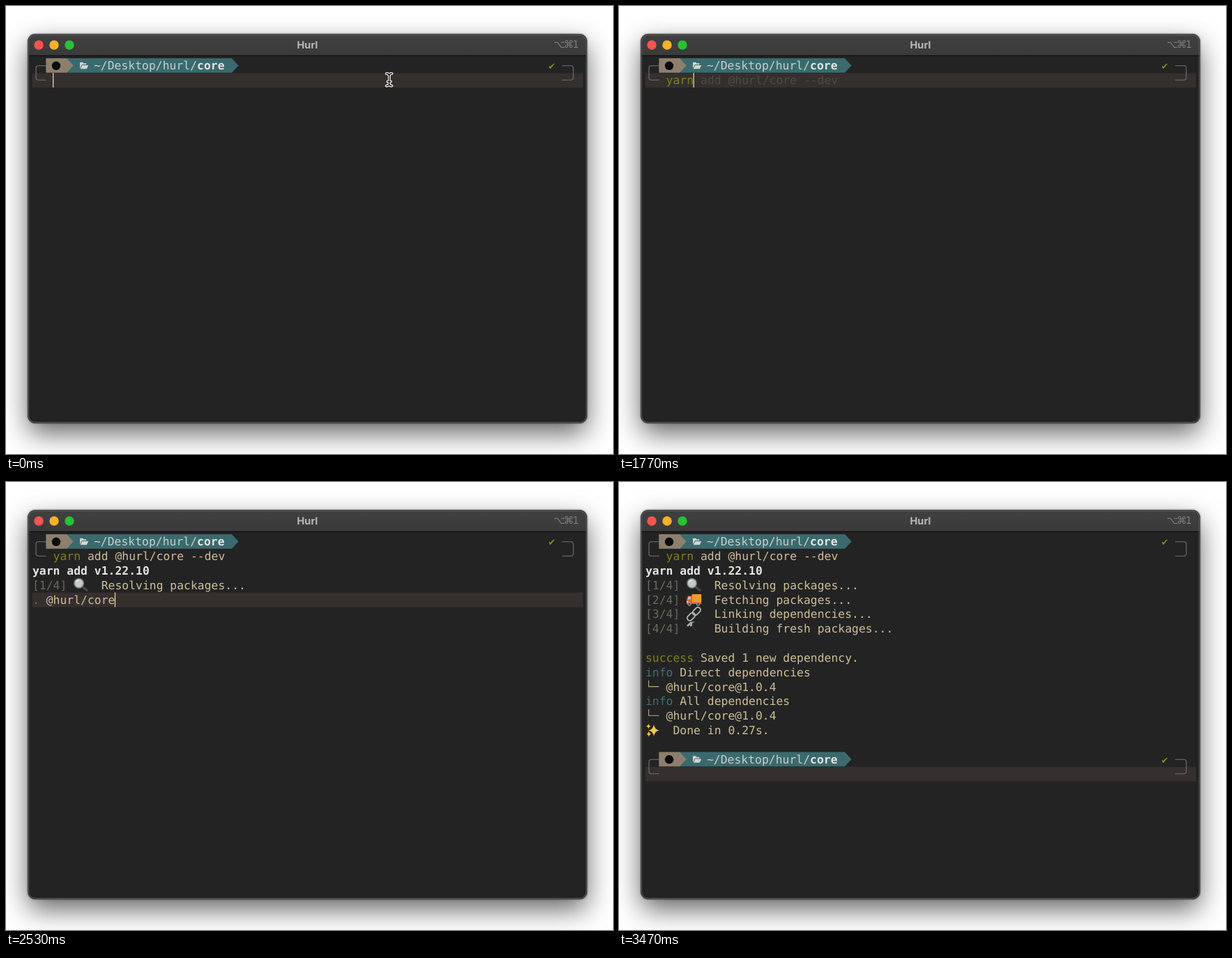
Animation of 871x643 px, one loop 3.51 s. Source, as an HTML page:

```html
<!DOCTYPE html>
<html lang="en">
<head>
<meta charset="utf-8">
<title>Terminal</title>
<style>
  html, body { margin: 0; width: 100%; height: 100%; overflow: hidden; background: #fff; }
  .window {
    position: absolute; left: 32px; top: 41px; width: 801px; height: 557px;
    border-radius: 10px; background: #232323;
    box-shadow: 0 0 0 1px #3a3a3a, 0 0 3px 1px rgba(0, 0, 0, .45), 0 15px 38px rgba(0, 0, 0, .62);
  }
  svg { position: absolute; left: 0; top: 0; }
  text {
    font: 16.4px "DejaVu Sans Mono", monospace;
    white-space: pre; text-rendering: geometricPrecision; fill: #cdbe97;
  }
  .title { font: 700 14.5px Inter, sans-serif; fill: #bababa; text-anchor: middle; }
  .keys { font: 14.5px "DejaVu Sans", sans-serif; fill: #7e7e7e; text-anchor: middle; }
  .check { font: 13px "DejaVu Sans", sans-serif; fill: #808a1b; text-anchor: middle; }
  .path { fill: #c8cfcb; }
  .bold { font-weight: 700; fill: #e4e4e0; }
  .green { fill: #7f801d; }
  .blue { fill: #41706f; }
  .dim { fill: #6d675c; }
  .hint { fill: #4e4947; }
  .bad { fill: #d43d2c; font-weight: 700; }
  .rule { fill: none; stroke: #737373; stroke-width: 1.1; }
  .tree { fill: none; stroke: #b9ac8a; stroke-width: 1.1; }
</style>
</head>
<body>
<div class="window"></div>
<svg width="871" height="643" viewBox="0 0 871 643">
  <defs>
    <linearGradient id="bar" x2="0" y2="1">
      <stop stop-color="#404040"/><stop offset="1" stop-color="#3a3a3a"/>
    </linearGradient>
    <path id="star" d="M0-1Q.15-.15 1 0Q.15.15 0 1Q-.15.15-1 0Q-.15-.15 0-1Z"/>
    <g id="prompt">
      <path class="rule" d="M57.5 85.8H46.5Q43 85.8 43 89.3V102.8Q43 106.3 46.5 106.3H57.5M798 85.8H810.5Q814 85.8 814 89.3V102.8Q814 106.3 810.5 106.3H798"/>
      <path fill="#3a6a6e" d="M86 75H324L333.7 85.4L324 95.8H86Z"/>
      <path fill="#8d7f6e" d="M57.3 75H87L96.7 85.4L87 95.8H57.3Z"/>
      <circle cx="72" cy="85.8" r="6.2" fill="#0b0b0b"/>
      <path fill="#d3d5cd" d="M106 89V81.6Q106 80.8 106.8 80.8H110L111.3 82.2H114.6Q115.4 82.2 115.4 83V84H109L106.4 89ZM109.4 85H118.2L115.8 90.2H106.8Z"/>
      <text class="path" x="126" y="91.3">~/Desktop/hurl/<tspan class="bold">core</tspan></text>
      <text class="check" x="783.3" y="91">✔</text>
    </g>
  </defs>

  <path fill="url(#bar)" d="M32 71V51Q32 41 42 41H823Q833 41 833 51V71Z"/>
  <path stroke="#0c0c0c" stroke-width="1.3" d="M32 71.4H833"/>
  <rect x="32.5" y="41.5" width="800" height="556" rx="9.5" fill="none" stroke="#686868" stroke-opacity=".75"/>
  <circle cx="47" cy="56" r="6.7" fill="#fd544e"/>
  <circle cx="69" cy="56" r="6.7" fill="#fdb225"/>
  <circle cx="91" cy="56" r="6.7" fill="#28c136"/>
  <text class="title" x="432.5" y="60.6">Hurl</text>
  <text class="keys" x="794" y="60">⌥</text>
  <text class="keys" x="807.5" y="60">⌘</text>
  <text class="keys" x="817.5" y="60">1</text>

  <rect id="band" x="37.6" width="790.4" height="20.8" fill="#352f2e"/>
  <use href="#prompt"/>
  <text id="command" x="67.6" y="112.1"><tspan id="verb"></tspan><tspan id="rest"></tspan><tspan id="hint" class="hint"></tspan></text>
  <g id="output"></g>

  <g data-from="2410">
    <path d="M109 149.5L116 155.5" stroke="#4a4a4a" stroke-width="3" stroke-linecap="round"/>
    <circle cx="104.6" cy="145.3" r="6.6" fill="#c3cac8" stroke="#858a89" stroke-width="1.6"/>
    <path d="M100.6 144Q101.6 140.8 105 140.8" fill="none" stroke="#eef2f1" stroke-width="1.3"/>
  </g>
  <g data-from="2600">
    <rect x="104.5" y="161" width="13.7" height="12.5" rx="1" fill="#f29a2e"/>
    <path fill="#e2632c" d="M97 175V169L99 163.5H105V175ZM104.5 172.5H118.2V175H104.5Z"/>
    <path fill="#9ed0e6" d="M98.4 168.5L99.8 164.8H103V168.5Z"/>
    <path fill="#ffd05a" d="M97 171H99.5V173H97Z"/>
    <circle cx="101" cy="175.2" r="2.3" fill="#555" stroke="#b8b8b8" stroke-width=".8"/>
    <circle cx="113.5" cy="175.2" r="2.3" fill="#555" stroke="#b8b8b8" stroke-width=".8"/>
  </g>
  <g data-from="2600" fill="none" stroke="#b4bcc0" stroke-width="1.8" transform="rotate(-45 107.5 189.5)">
    <rect x="95.5" y="185.7" width="13" height="7.4" rx="3.7"/>
    <rect x="106.5" y="185.7" width="13" height="7.4" rx="3.7"/>
  </g>
  <g data-from="2630">
    <path d="M102.5 205L110.5 213.5" stroke="#34302e" stroke-width="2.4"/>
    <path fill="#a6abad" d="M97 205.8L102.5 200.8L109 200.6L104.8 203L105.2 206L103 207.4L101.2 205.4L98.8 207.8Z"/>
  </g>
  <g data-from="2630" fill="#f8c946">
    <use href="#star" transform="translate(50 356.5) scale(7.6 8.6)"/>
    <use href="#star" transform="translate(42.3 350.6) scale(3.4 3.8)"/>
    <use href="#star" transform="translate(42.8 361.8) scale(3.6 4.2)"/>
  </g>
  <use href="#prompt" y="312.5" data-from="2700"/>

  <rect id="caret" width="1.3" height="20.8" fill="#e6d3a8"/>
  <g data-from="0" data-to="1200" fill="none" stroke-linecap="round">
    <path id="beam" stroke="#f2f2f2" stroke-width="3.6" d="M546 97Q549.8 97 549.8 100.5Q549.8 97 553.6 97M549.8 100V111M547.6 108.6H552M546 114.6Q549.8 114.6 549.8 111Q549.8 114.6 553.6 114.6"/>
    <use href="#beam" style="stroke:#111;stroke-width:1.3"/>
    <path stroke="#111" stroke-width="1.3" d="M546 97Q549.8 97 549.8 100.5Q549.8 97 553.6 97M549.8 100V111M547.6 108.6H552M546 114.6Q549.8 114.6 549.8 111Q549.8 114.6 553.6 114.6"/>
  </g>
</svg>
<script>
const LOOP = 3510, LEFT = 38, TOP = 74.9, CHAR = 9.873, ROW = 20.83;
const COMMAND = "yarn add @hurl/core --dev";
const $ = id => document.getElementById(id);
const rowTop = row => TOP + ROW * row;

// Columns: start time, row, column, markup, optional end time.
const lines = [
  [2370, 2, 0, '<tspan class="bold">yarn add v1.22.10</tspan>'],
  [2410, 3, 0, '<tspan class="dim">[1/4]</tspan>     Resolving packages...'],
  [2500, 4, 0, '<tspan class="dim">.</tspan> @hurl/core', 2600],
  [2600, 4, 0, '<tspan class="dim">[2/4]</tspan>     Fetching packages...'],
  [2600, 5, 0, '<tspan class="dim">[3/4]</tspan>     Linking dependencies...'],
  [2630, 6, 0, '<tspan class="dim">[4/4]</tspan>     Building fresh packages...'],
  [2630, 8, 0, '<tspan class="green">success</tspan> Saved 1 new dependency.'],
  [2630, 9, 0, '<tspan class="blue">info</tspan> Direct dependencies'],
  [2630, 10, 3, '@hurl/core@1.0.4'],
  [2630, 11, 0, '<tspan class="blue">info</tspan> All dependencies'],
  [2630, 12, 3, '@hurl/core@1.0.4'],
  [2630, 13, 4, 'Done in 0.27s.']
];
const branch = row =>
  `<path class="tree" data-from="2630" d="M42.6 ${rowTop(row) + 1.5}V${rowTop(row) + 10.4}H57.2"/>`;

$("output").innerHTML = lines.map(([from, row, col, markup, to = LOOP]) =>
  `<text data-from="${from}" data-to="${to}" x="${LEFT + col * CHAR}" y="${rowTop(row) + 16.4}">${markup}</text>`
).join("") + branch(10) + branch(12);

const timed = [...document.querySelectorAll("[data-from]")].map(el =>
  ({ el, from: +el.dataset.from, to: +(el.dataset.to || LOOP) }));

// Each step: time, value(s) held until the next step.
const typing = [[0, 0], [1200, 1], [1300, 2], [1400, 3], [1500, 4], [1900, COMMAND.length]];
const carets = [[0, 1, 3], [2270, 2, 0], [2370, 3, 0], [2410, 4, 0], [2500, 4, 12],
  [2600, 6, 0], [2630, 14, 0], [2700, 16, 3]];
const blinks = [[0, 1], [320, 0], [820, 1], [3220, 0]];
const at = (steps, t) => steps.filter(s => s[0] <= t).pop();

function draw() {
  const t = performance.now() % LOOP;
  for (const { el, from, to } of timed)
    el.style.display = t >= from && t < to ? "" : "none";

  const typed = at(typing, t)[1];
  $("verb").setAttribute("class", typed < 4 ? "bad" : "green");
  $("verb").textContent = COMMAND.slice(0, Math.min(typed, 4));
  $("rest").textContent = COMMAND.slice(4, Math.max(typed, 4));
  $("hint").textContent = typed ? COMMAND.slice(typed) : "";

  const [, row, col] = at(carets, t);
  $("band").setAttribute("y", rowTop(row) + .6);
  $("caret").setAttribute("x", LEFT - .6 + (col + (row === 1 ? typed : 0)) * CHAR);
  $("caret").setAttribute("y", rowTop(row) + .4);
  $("caret").style.opacity = at(blinks, t)[1];
  requestAnimationFrame(draw);
}
draw();
</script>
</body>
</html>
```
